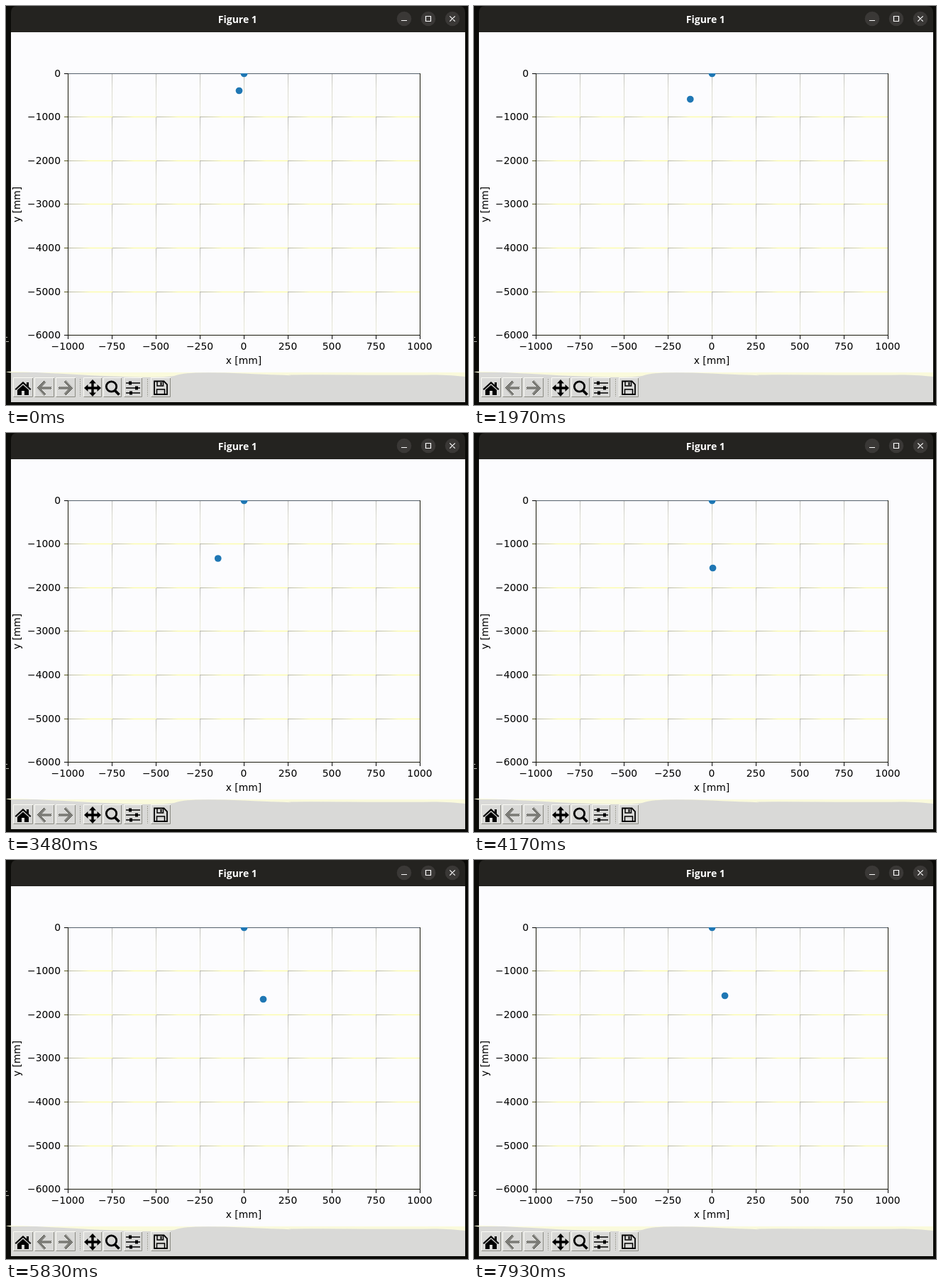
Write an HTML page that moves like this. It is 651x563 px and loops after 8000 ms.

```html
<!DOCTYPE html>
<html lang="en">
<head>
<meta charset="utf-8">
<title>Figure 1</title>
<style>
  html, body { margin: 0; width: 100%; height: 100%; overflow: hidden; background: #0b0b08; }
  svg { display: block; width: 651px; height: 563px; }
  text { font: 13.89px "DejaVu Sans", sans-serif; fill: #000; }
  .title { font: bold 14px "Open Sans", "Noto Sans", sans-serif; fill: #fff; }
  .mid { text-anchor: middle; }
  .end { text-anchor: end; }
  .line { fill: none; stroke: #000; }
  .dot { fill: #1f77b4; }
</style>
</head>
<body>
<svg viewBox="0 0 651 563">
  <defs>
    <linearGradient id="gridX" gradientUnits="userSpaceOnUse" x1="87.5" x2="149.5" y1="0" y2="0" spreadMethod="repeat">
      <stop offset="0" stop-color="#b4b4a4"/>
      <stop offset=".3" stop-color="#d8d8a8"/>
      <stop offset=".5" stop-color="#fcfc94"/>
      <stop offset="1" stop-color="#fcfc94"/>
    </linearGradient>
    <linearGradient id="gridY" gradientUnits="userSpaceOnUse" x1="0" x2="0" y1="95" y2="156.6" spreadMethod="repeat">
      <stop offset="0" stop-color="#b8b8b4"/>
      <stop offset=".35" stop-color="#d8d8cc"/>
      <stop offset="1" stop-color="#ececd8"/>
    </linearGradient>
    <pattern id="stipple" width="2" height="2" patternUnits="userSpaceOnUse">
      <path d="M0 0h1v1h-1zM1 1h1v1h-1z" fill="#1c1c14" shape-rendering="crispEdges"/>
    </pattern>
    <clipPath id="axes"><rect x="87" y="95" width="497" height="370"/></clipPath>
  </defs>

  <!-- window -->
  <path d="M7 38V9Q7 0 16 0H638Q647 0 647 9V38Z" fill="#242320"/>
  <path d="M7 37H647V559H7Z" fill="#fcfcfe"/>
  <path d="M0 467.5H2M0 473.5H4" stroke="#b8b8b0"/>
  <text class="title mid" x="326.3" y="24">Figure 1</text>
  <g fill="#3a3836">
    <circle cx="561" cy="18" r="10.3"/>
    <circle cx="595" cy="18" r="10.3"/>
    <circle cx="629" cy="18" r="10.3"/>
  </g>
  <path d="M557 20.5h8M591.5 14.5h7v7h-7zM625.3 14.3l7.4 7.4M632.7 14.3l-7.4 7.4" fill="none" stroke="#fff" stroke-width="1.2"/>

  <!-- plot -->
  <g id="plot"></g>
  <text class="mid" x="335" y="505">x [mm]</text>
  <text class="mid" transform="translate(20 280) rotate(-90)">y [mm]</text>
  <g clip-path="url(#axes)">
    <circle class="dot" cx="335.5" cy="95.5" r="4.86"/>
    <circle class="dot" id="bob" r="4.86"/>
  </g>

  <!-- toolbar -->
  <path d="M7 517H647V559H7Z" fill="#d9d9d7"/>
  <path d="M7 517H647V523Q625 520 600 520.500T480 520.500T400 521T335 518.500T240 521T100 520T7 517.500Z" fill="#fafadc"/>
  <g id="buttons"></g>
  <path d="M104.5 526V551M199.5 526V551" stroke="#a4a49c" stroke-dasharray="2 1"/>
  <path d="M24 530L12.5 540.5L14 542L24 533L34 542L35.5 540.5L32 537.3V531H29V534.5ZM24 534.7L16 541.8V549H22V543H26V549H32V541.8Z"/>
  <g fill="none" stroke="url(#stipple)" stroke-width="3.6">
    <path d="M55 529.5L46 539L55 548.5M47 539H64"/>
    <path d="M83 529.5L92 539L83 548.5M91 539H74"/>
  </g>
  <path d="M122 527L127 532.5H123.7V537.3H128.5V534L134 539L128.5 544V540.7H123.7V545.5H127L122 551L117 545.5H120.3V540.7H115.5V544L110 539L115.5 534V537.3H120.3V532.5H117Z"/>
  <circle class="line" cx="148.5" cy="537" r="7.2" stroke-width="2.8"/>
  <path class="line" d="M153.5 542.5L159.5 548.5" stroke-width="3.8"/>
  <path class="line" d="M169 532H189M169 539H189M169 546H189" stroke-width="1.6"/>
  <path d="M173 529.5h4v5h-4zM182 536.5h4v5h-4zM174 543.5h4v5h-4z"/>
  <path class="line" d="M209 529.5H222.5L227 534V548H209Z" stroke-width="1.8"/>
  <path class="line" d="M213 529.5V536H221.5V529.5M212.5 548V541H223.5V548" stroke-width="1.5"/>
  <path d="M217.5 531h2v4h-2z"/>
</svg>
<script>
  const LOOP = 8000;
  const NS = "http://www.w3.org/2000/svg";

  function add(parent, tag, attrs, text) {
    const el = document.createElementNS(NS, tag);
    for (const key in attrs) el.setAttribute(key, attrs[key]);
    if (text) el.textContent = text;
    parent.append(el);
  }

  function bar(x, y, w, h, fill) {
    add(plot, "rect", { x, y, width: w, height: h, fill });
  }

  const plot = document.getElementById("plot");
  const label = n => String(n).replace("-", "\u2212");

  for (let i = 0; i <= 8; i++) {
    const x = 87 + 62 * i;
    if (i % 8) bar(x, 95, 1, 370, "url(#gridY)");
    bar(x, 465, 1, 5, "#000");
    add(plot, "text", { x, y: 485, class: "mid" }, label(-1000 + 250 * i));
  }
  for (let i = 0; i <= 6; i++) {
    const y = Math.floor(95.3 + 61.55 * i);
    if (i % 6) bar(87, y, 497, 1, "url(#gridX)");
    bar(82, y, 5, 1, i % 6 ? "#5c5c20" : "#000");
    add(plot, "text", { x: 77, y: y + 5, class: "end" }, label(-1000 * i));
  }
  bar(87, 95, 497, 1, "#55606c");
  bar(87, 464, 497, 1, "#18180c");
  bar(87, 95, 1, 370, "#18180c");
  bar(583, 95, 1, 370, "#18180c");

  const buttons = document.getElementById("buttons");
  for (const x of [10, 40, 70, 109, 137, 166, 204]) {
    const w = x > 100 && x < 200 ? 26 : 28;
    add(buttons, "path", { d: `M${x + .5} 552V524.5H${x + w}`, fill: "none", stroke: "#fafaf4" });
    add(buttons, "path", { d: `M${x + .5} 551.5H${x + w - .5}V525`, fill: "none", stroke: "#8c8c84" });
  }

  // path of the bob: time, x, y
  const path = [
    [0, 328.5, 119.5], [1090, 327.5, 118.5], [2880, 274.5, 160.5], [4170, 336.5, 190.5],
    [5830, 362.5, 196.5], [6830, 355.5, 194.5], [7930, 353.5, 191.5]
  ];

  // redraw times: first, last, count
  const redraws = [
    [0, 0, 1], [210, 1090, 5], [1310, 2180, 7], [2400, 2880, 4], [3050, 3260, 3],
    [3480, 4170, 6], [4380, 4380, 1], [4600, 5500, 6], [5710, 5830, 2], [5870, 6650, 6],
    [6830, 6830, 1], [6870, 7860, 7], [7930, 7930, 1]
  ].flatMap(([a, b, n]) =>
    Array.from({ length: n }, (_, i) => n > 1 ? a + (b - a) * i / (n - 1) : a));

  function slope(i, axis) {
    return (path[i + 1][axis] - path[i][axis]) / (path[i + 1][0] - path[i][0]);
  }

  // harmonic mean keeps the curve from overshooting
  function tangent(i, axis) {
    if (i === 0) return 0;
    if (i === path.length - 1) return slope(i - 1, axis);
    const a = slope(i - 1, axis), b = slope(i, axis);
    return a * b > 0 ? 2 * a * b / (a + b) : 0;
  }

  function place(t, axis) {
    let i = 0;
    while (i < path.length - 2 && t >= path[i + 1][0]) i++;
    const h = path[i + 1][0] - path[i][0];
    const u = (t - path[i][0]) / h, v = 1 - u;
    return v * v * (1 + 2 * u) * path[i][axis] + u * u * (3 - 2 * u) * path[i + 1][axis]
      + h * u * v * (v * tangent(i, axis) - u * tangent(i + 1, axis));
  }

  const bob = document.getElementById("bob");
  const start = performance.now();

  function draw() {
    const now = (performance.now() - start) % LOOP;
    const t = redraws.findLast(r => r <= now + .5);
    bob.setAttribute("cx", place(t, 1));
    bob.setAttribute("cy", place(t, 2));
    requestAnimationFrame(draw);
  }
  draw();
</script>
</body>
</html>
```
